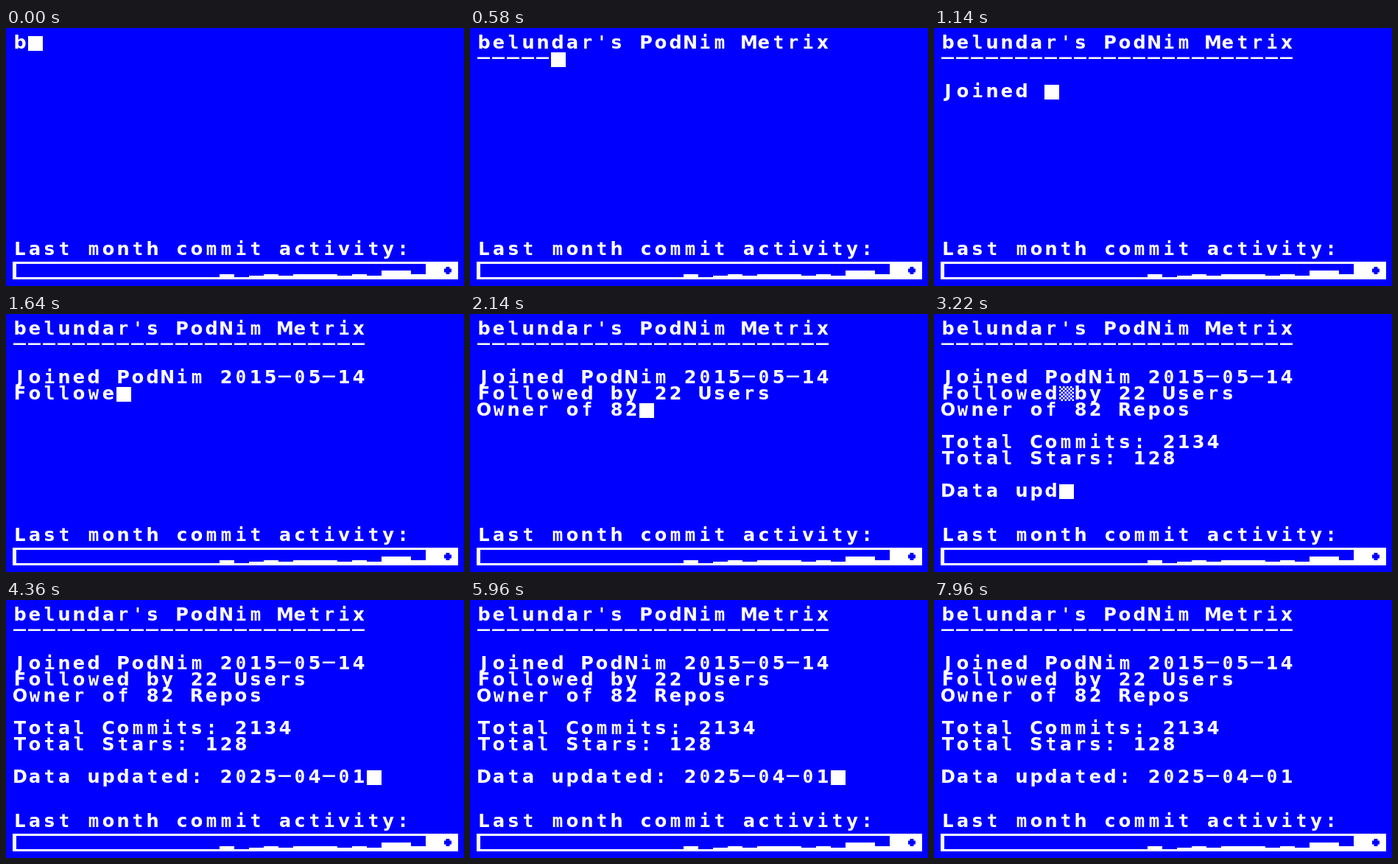
Write an HTML page with a canvas that moves like this. It is 622 px wide and 350 px high and loops after 8360 ms.

```html
<!DOCTYPE html>
<html lang="en">
<head>
<meta charset="utf-8">
<title>Terminal stats</title>
<style>
html, body { margin: 0; width: 100%; height: 100%; overflow: hidden; background: #00f; }
canvas { display: block; }
</style>
</head>
<body>
<canvas id="screen" width="622" height="350"></canvas>
<script>
const ctx = document.getElementById('screen').getContext('2d');
const BLUE = '#00f', WHITE = '#fff';
const LOOP = 8360, STEP = 20, BLINK = 400;
const LEFT = 10, TOP = 10, CELL = 20, LINE = 22, DOT = 2.5;

const text = [
  "belundar's PodNim Metrix",
  '-'.repeat(24),
  '',
  'Joined PodNim 2015-05-14',
  'Followed by 22 Users',
  'Owner of 82 Repos',
  '',
  'Total Commits: 2134',
  'Total Stars: 128',
  '',
  'Data updated: 2025-04-01'
].join('\n');
const typed = (text.length - 1) * STEP;

// Brief static on a finished cell: [start, row, column]
const glitches = [[2320, 3, 6], [2760, 0, 10], [3220, 4, 8]];

// Chart columns of one cell each: [first column, count, top]
const bars = [
  [14, 1, 334], [16, 1, 336], [17, 1, 334], [18, 1, 336], [19, 3, 334],
  [22, 1, 336], [23, 1, 334], [24, 1, 336], [25, 2, 329], [27, 1, 334]
];

function box(x, y, w, h, color = WHITE) {
  ctx.fillStyle = color;
  ctx.fillRect(x, y, w, h);
}

// Wide letters use the proportional face, narrow and crowded ones the mono face
function glyph(c, x, y) {
  if (c === '-') return box(x, y + 3 * DOT, 6.8 * DOT, DOT);
  const face = /[mwijlrtf0]/.test(c) ? 'DejaVu Sans Mono' : 'DejaVu Sans';
  ctx.font = `bold 24px "${face}", monospace`;
  ctx.fillStyle = WHITE;
  ctx.fillText(c, x + 9, y + 18);
}

function print(str, y) {
  [...str].forEach((c, i) => glyph(c, LEFT + i * CELL, y));
}

function checker(x, y) {
  box(x, y, CELL, CELL, BLUE);
  for (let i = 0; i < 64; i++) {
    const col = i % 8, row = i >> 3;
    if ((col + row) % 2 === 0) box(x + col * DOT, y + row * DOT, DOT, DOT);
  }
}

function chart() {
  box(9, 317, 605, 24);
  box(14, 320, 556, 18, BLUE);
  for (const [col, count, top] of bars) {
    box(LEFT + col * CELL, top, count * CELL, 339 - top);
  }
  box(595, 326.5, 10, 5, BLUE);
  box(597.5, 324, 5, 10, BLUE);
}

function draw(t) {
  box(0, 0, 622, 350, BLUE);
  ctx.textAlign = 'center';

  const lines = text.slice(0, Math.floor(t / STEP) + 1).split('\n');
  lines.forEach((line, i) => print(line, TOP + i * LINE));

  for (const [start, row, col] of glitches) {
    if (t >= start && t < start + STEP) checker(LEFT + col * CELL, TOP + row * LINE);
  }

  const idle = t - typed - STEP;
  if (idle < 0 || Math.floor(idle / BLINK) % 2 === 0) {
    const row = lines.length - 1;
    box(LEFT + lines[row].length * CELL, TOP + 1 + row * LINE, CELL, CELL);
  }

  print('Last month commit activity:', 290);
  chart();
}

function frame() {
  draw(performance.now() % LOOP);
  requestAnimationFrame(frame);
}
frame();
</script>
</body>
</html>
```
